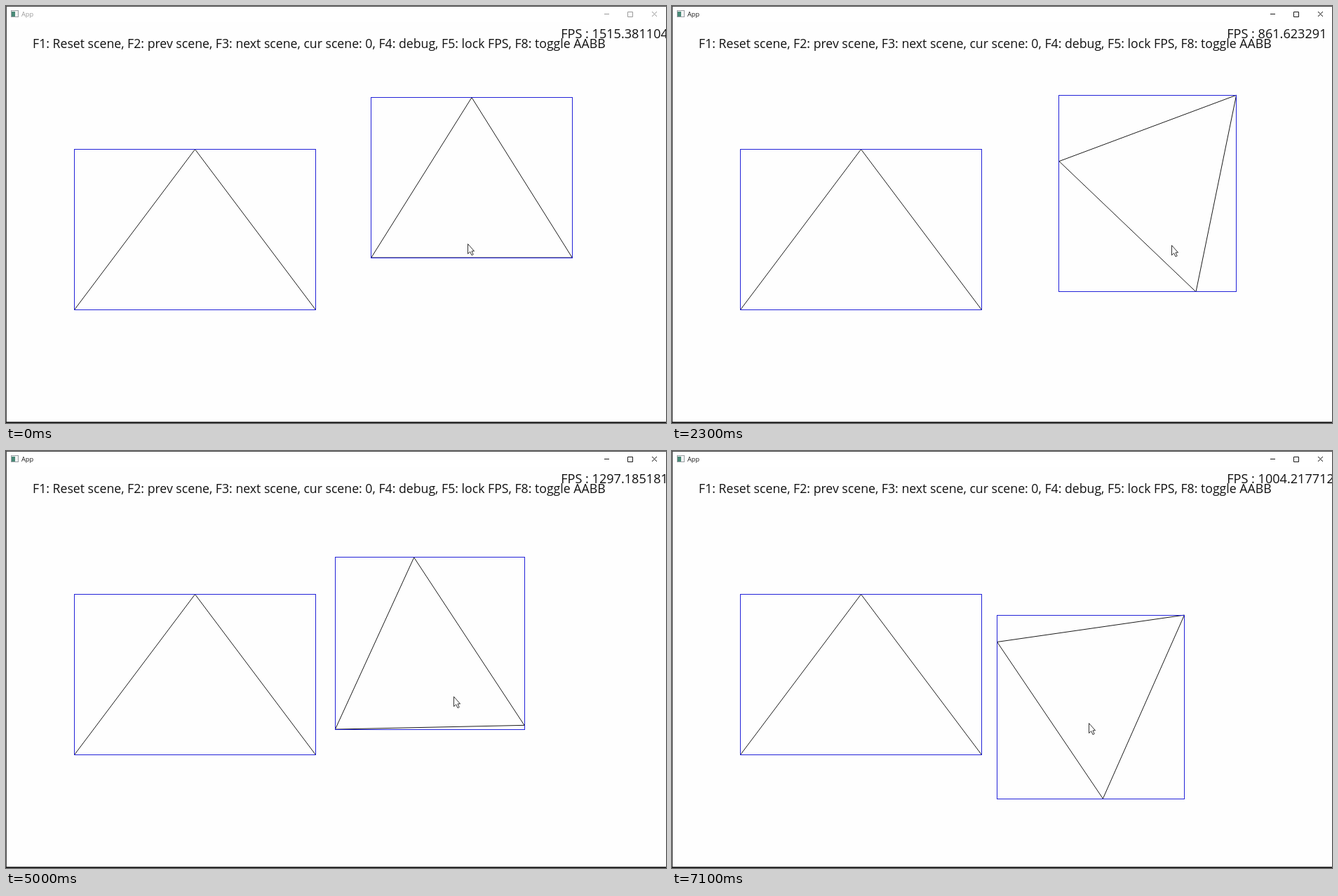
These frames come from a looping animation (941 px wide and 595 px high, 7200 ms). An HTML page:

```html
<!DOCTYPE html>
<html lang="en">
<head>
<meta charset="utf-8">
<title>App</title>
<style>
  html, body { margin: 0; width: 100%; height: 100%; overflow: hidden; background: #fefefe; }
  svg { display: block; width: 941px; height: 595px; }
  text { font-family: "Open Sans", "Noto Sans", sans-serif; }
  .shape { fill: none; stroke: #1a1a1a; }
  .box { fill: none; }
</style>
</head>
<body>
<svg viewBox="0 0 941 595">
  <rect width="941" height="595" fill="#fefefe"/>
  <rect width="941" height="23" fill="#fff"/>
  <g id="titleBar" stroke="#222" fill="none">
    <text x="22" y="15" font-size="9.2" fill="#222" stroke="none" id="title">App</text>
    <path d="M853 11.5h7M886.5 8.5h7v7h-7zM921 8l7 7M928 8l-7 7"/>
  </g>
  <g>
    <rect x="7.5" y="6.5" width="10" height="9" fill="#f4f4f4" stroke="#9a9fa4"/>
    <rect x="8" y="8" width="5" height="7" fill="#4a8a78"/>
  </g>
  <text x="38" y="60" font-size="17.7" fill="#111">F1: Reset scene, F2: prev scene, F3: next scene, cur scene: 0, F4: debug, F5: lock FPS, F8: toggle AABB</text>
  <text id="fps" x="791.2" y="45.5" font-size="18.1" fill="#111"></text>
  <path class="shape" d="M269.5 204.5L441.5 433.5H97.5Z"/>
  <path class="shape" id="triangle"/>
  <rect class="box" id="fixedBox" x="97.5" y="204.5" width="344" height="229"/>
  <rect class="box" id="movingBox"/>
  <path id="cursor" d="M.5 .5V14.6L3.7 11.6 6 16.6 8.2 15.6 6 10.8H9.6Z" fill="#fff" stroke="#333"/>
  <path d="M0 .5H941M.5 0V595" stroke="#4a4a4a"/>
  <rect y="593.3" width="941" height="1.7" fill="#151515"/>
</svg>
<script>
const LOOP = 7200, STEP = 100, GRAB_TIME = 700;
const BLUE = '#2222d8', GREEN = '#22e022';
const BASE = 286.5, HEIGHT = 228.5;
const CORNERS = [[0, -HEIGHT * 2 / 3], [BASE / 2, HEIGHT / 3], [-BASE / 2, HEIGHT / 3]];
const FIXED = { left: 97.5, top: 204.5, right: 441.5, bottom: 433.5 };
const REST = [-6.5, 55.7], GRAB = [-53, 14];
const READINGS = '1515.381104 1021.554810 861.623291 945.447632 2151.926025 1297.185181 1004.217712'.split(' ');

// Turning points of the drag: time, centroid, angle
const DRAG = [
  { t: GRAB_TIME, x: 664, y: 282.9, angle: 0 },
  { t: 1400, x: 676.8, y: 280.8, angle: -19.6 },
  { t: 2300, x: 701.2, y: 252.2, angle: -78.4 },
  { t: 3300, x: 679.5, y: 217.5, angle: -148.4 },
  { t: 4100, x: 637.8, y: 297.5, angle: -135.2 },
  { t: 4400, x: 616, y: 318.5, angle: -132 },
  { t: 5800, x: 584.2, y: 303.2, angle: -108.5 },
  { t: 6900, x: 602.5, y: 298, angle: -77 },
  { t: 7100, x: 602.8, y: 334.2, angle: -66.1 }
];

const el = id => document.getElementById(id);
const setAttrs = (node, attrs) => {
  for (const name in attrs) node.setAttribute(name, attrs[name]);
};
const snap = v => Math.floor(v) + 0.5;
const clamp = (v, lo, hi) => Math.min(hi, Math.max(lo, v));
const smooth = u => u * u * (3 - 2 * u);
const mix = (a, b, u) => a + (b - a) * u;

const slope = (i, key) => (DRAG[i + 1][key] - DRAG[i][key]) / (DRAG[i + 1].t - DRAG[i].t);

// Harmonic mean of neighbouring slopes keeps the curve free of overshoot.
function tangent(i, key) {
  if (i === 0 || i === DRAG.length - 1) return 0;
  const a = slope(i - 1, key), b = slope(i, key);
  return a * b <= 0 ? 0 : 2 * a * b / (a + b);
}

function dragAt(time, key) {
  const t = clamp(time, DRAG[0].t, DRAG[DRAG.length - 1].t);
  const i = DRAG.findIndex((k, n) => t <= DRAG[n + 1].t);
  const span = DRAG[i + 1].t - DRAG[i].t;
  const u = (t - DRAG[i].t) / span, v = 1 - u;
  return mix(DRAG[i][key], DRAG[i + 1][key], smooth(u))
    + span * u * v * (tangent(i, key) * v - tangent(i + 1, key) * u);
}

function rotate([x, y], degrees) {
  const a = degrees * Math.PI / 180, cos = Math.cos(a), sin = Math.sin(a);
  return [x * cos - y * sin, x * sin + y * cos];
}

// The cursor runs ahead of the grab point during the fast swing.
function pullAt(time) {
  const swing = clamp((time - 1400) / 2700, 0, 1);
  const length = 46 * Math.sin(Math.PI * swing) ** 2;
  return rotate([length, 0], 77 + 0.06 * (time - 2300));
}

function render(time) {
  const [x, y, angle] = ['x', 'y', 'angle'].map(key => dragAt(time, key));
  const points = CORNERS.map(corner => {
    const [dx, dy] = rotate(corner, angle);
    return [x + dx, y + dy];
  });
  const xs = points.map(p => p[0]), ys = points.map(p => p[1]);
  const left = snap(Math.min(...xs)), right = snap(Math.max(...xs));
  const top = snap(Math.min(...ys)), bottom = snap(Math.max(...ys));
  const overlap = left < FIXED.right && right > FIXED.left
    && top < FIXED.bottom && bottom > FIXED.top;
  const stroke = overlap ? GREEN : BLUE;

  setAttrs(el('triangle'), { d: 'M' + points.map(p => p.join(' ')).join('L') + 'Z' });
  setAttrs(el('movingBox'), { x: left, y: top, width: right - left, height: bottom - top, stroke });
  setAttrs(el('fixedBox'), { stroke });

  const reach = smooth(clamp(time / GRAB_TIME, 0, 1));
  const hold = rotate(REST.map((v, i) => mix(v, GRAB[i], reach)), angle);
  const pull = pullAt(time);
  const cx = Math.round(x + hold[0] + pull[0]), cy = Math.round(y + hold[1] + pull[1]);
  setAttrs(el('cursor'), { transform: `translate(${cx} ${cy})` });

  const ink = time < GRAB_TIME ? '#999' : '#1a1a1a';
  setAttrs(el('titleBar'), { stroke: ink });
  setAttrs(el('title'), { fill: ink });
  el('fps').textContent = 'FPS : ' + READINGS[Math.min(READINGS.length - 1, Math.floor(time / 1000))];
}

const start = performance.now();
function tick() {
  const elapsed = (performance.now() - start) % LOOP;
  render(Math.floor(elapsed / STEP) * STEP);
  requestAnimationFrame(tick);
}
tick();
</script>
</body>
</html>
```
